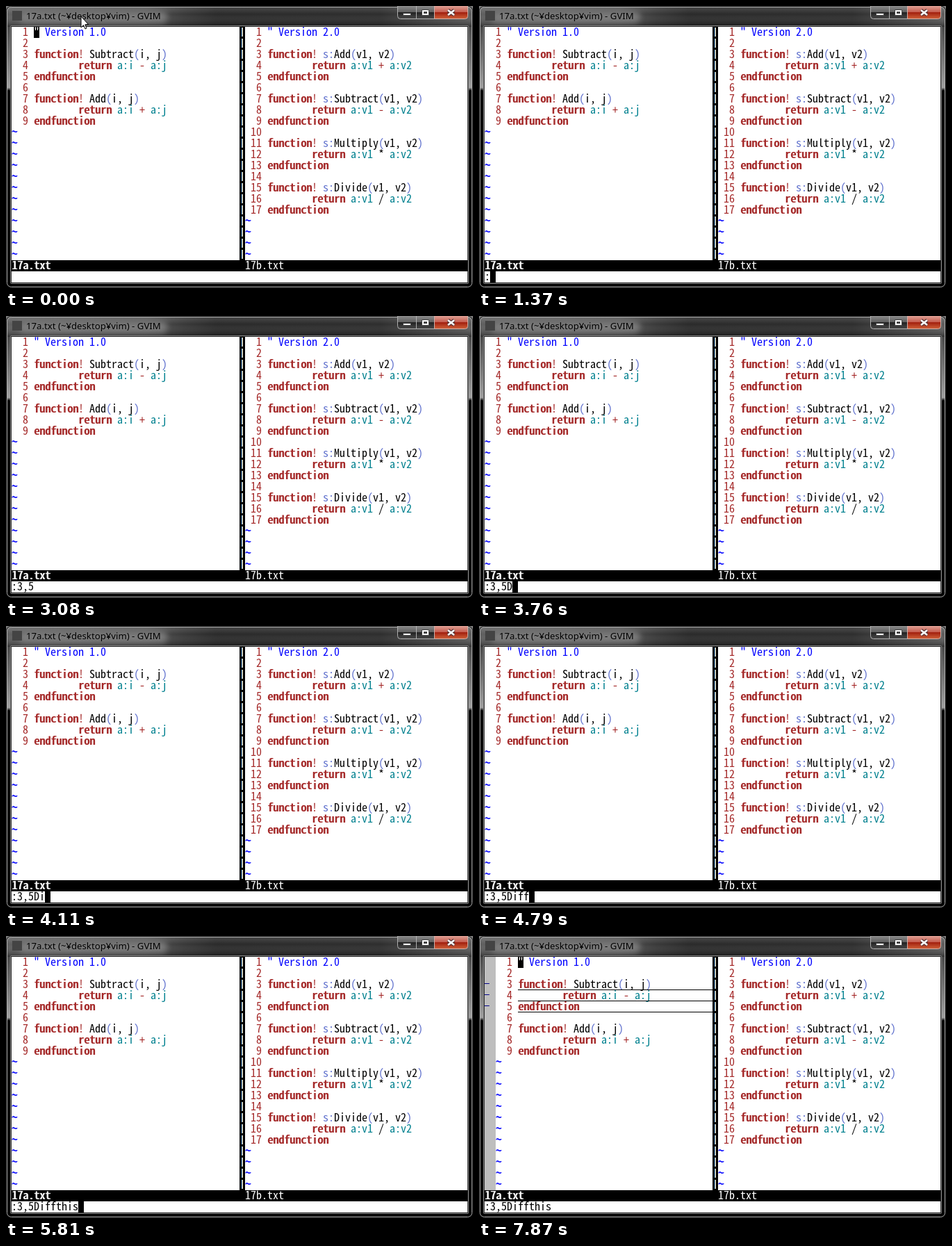
Recreate the animation shown at these times as an HTML page with a canvas. Size 672 px wide and 406 px high, loop 8 s.

```html
<!DOCTYPE html>
<html lang="en">
<head>
<meta charset="utf-8">
<title>Vim range diff</title>
<style>
html, body { margin: 0; width: 100%; height: 100%; overflow: hidden; background: #000; }
canvas { display: block; }
</style>
</head>
<body>
<canvas id="stage" width="672" height="406"></canvas>
<script>
const ctx = document.getElementById('stage').getContext('2d');
const LOOP = 8000, DIFF_AT = 7870;
const CW = 8, LH = 16, LEFT = 8, TOP = 30, ROWS = 21, SPLIT = 336, RIGHT = 344;
const BROWN = '#a52a2a', BLUE = '#0000ff', BLACK = '#000';

// Choose the font size whose advance is one cell
const FAMILY = '"Noto Sans Mono CJK JP", "Noto Sans Mono", "Liberation Mono", monospace';
ctx.font = `100px ${FAMILY}`;
const MONO = `${100 * CW / ctx.measureText('M').width}px ${FAMILY}`;

const oldText = `" Version 1.0

function! Subtract(i, j)
        return a:i - a:j
endfunction

function! Add(i, j)
        return a:i + a:j
endfunction`.split('\n');

const newText = ['" Version 2.0'];
for (const [name, op] of [['Add', '+'], ['Subtract', '-'], ['Multiply', '*'], ['Divide', '/']])
  newText.push('', `function! s:${name}(v1, v2)`, `        return a:v1 ${op} a:v2`, 'endfunction');

// Capture groups: comment, keyword, operator, special, variable
const TOKEN = /(".*)|(endfunction|function|return)|([-+!])|(s:|[()])|(a:\w+)|\w+|\S/g;
const COLORS = [BLACK, BLUE, BROWN, BROWN, '#5f70cd', '#00808f'];

const COMMAND = ':3,5Diffthis';
const KEY_TIMES = [1370, 1720, 2050, 2450, 3760, 4110, 4440, 4790, 5120, 5120, 5470, 5810];

function rect(x, y, w, h, fill) {
  ctx.fillStyle = fill;
  ctx.fillRect(x, y, w, h);
}

function text(str, x, y, color, bold) {
  ctx.font = MONO;
  ctx.fillStyle = color;
  ctx.fillText(str, x, y + 13);
  if (bold) ctx.fillText(str, x + 1, y + 13);
}

function gradient(x0, y0, x1, y1, ...stops) {
  const g = ctx.createLinearGradient(x0, y0, x1, y1);
  for (const [at, color] of stops) g.addColorStop(at, color);
  return g;
}

function box(x, y, w, h, radii, fill, stroke) {
  ctx.beginPath();
  ctx.roundRect(x, y, w, h, radii);
  if (fill) { ctx.fillStyle = fill; ctx.fill(); }
  if (stroke) { ctx.strokeStyle = stroke; ctx.lineWidth = 1; ctx.stroke(); }
}

function drawButtons() {
  const grey = gradient(0, 0, 0, 19, [0, '#8c8c8c'], [.48, '#5c5c5c'], [.5, '#222'], [1, '#4c4c4c']);
  const red = gradient(0, 0, 0, 19, [0, '#dfa095'], [.48, '#c4584a'], [.5, '#a3200f'], [1, '#d2663c']);
  box(563.5, -2.5, 27, 21, [0, 0, 0, 4], grey, '#b0b0b0');
  box(590.5, -2.5, 26, 21, 0, grey, '#b0b0b0');
  box(616.5, -2.5, 48, 21, [0, 0, 4, 0], red, '#d0b0aa');
  box(571.5, 10.5, 11, 3, 0, '#fff', '#444');
  box(598.5, 5.5, 10, 8, 0, '#fff', '#444');
  rect(601, 8, 5, 3, '#444');
  for (const [color, width] of [['#533', 5], ['#fff', 2.6]]) {
    ctx.strokeStyle = color;
    ctx.lineWidth = width;
    ctx.beginPath();
    ctx.moveTo(636, 6); ctx.lineTo(645, 13);
    ctx.moveTo(645, 6); ctx.lineTo(636, 13);
    ctx.stroke();
  }
}

function drawWindow() {
  rect(0, 0, 672, 406, BLACK);
  rect(0, 0, 672, TOP, gradient(0, 0, 672, 0, [0, '#555'], [.3, '#484848'],
    [.38, '#2c2c2c'], [.45, '#1c1c1c'], [.8, '#202020'], [1, '#555']));
  rect(0, 0, 672, TOP, gradient(0, 0, 0, TOP, [0, '#ffffff38'], [.4, '#ffffff10'], [1, '#00000060']));
  ctx.filter = 'blur(4px)';
  box(18, 8, 214, 16, 8, '#7c7c7c');
  ctx.filter = 'none';

  const side = gradient(0, TOP, 0, 122, [0, '#4a4a4a'], [.95, '#a0a0a0'], [1, BLACK]);
  rect(0, TOP, LEFT, 92, side);
  rect(664, TOP, LEFT, 92, side);
  box(.5, .5, 671, 405, 7, null, BLACK);
  box(1.5, 1.5, 669, 403, 6, null, '#b4b4b4');
  box(6.5, 28.5, 659, 371, 1, null, '#8a8a8a');
  box(7.5, 29.5, 657, 369, 0, null, '#222');
  drawButtons();
  rect(9, 7, 14, 14, '#444');
  ctx.font = '13.2px "Noto Sans", "Open Sans", sans-serif';
  ctx.fillStyle = BLACK;
  ctx.fillText('17a.txt (~¥desktop¥vim) - GVIM', 29, 19);
}

function drawBuffer(lines, x) {
  for (let row = 0; row < ROWS; row++) {
    const y = TOP + row * LH;
    if (row >= lines.length) {
      text('~', x, y, BLUE, true);
      continue;
    }
    text(String(row + 1).padStart(3), x, y, BROWN);
    for (const m of lines[row].matchAll(TOKEN)) {
      const kind = Math.max(0, m.findIndex((part, i) => i && part));
      text(m[0], x + (4 + m.index) * CW, y, COLORS[kind], kind === 2);
    }
  }
}

function drawDiffMarks() {
  rect(LEFT, TOP, 2 * CW, ROWS * LH, '#bebebe');
  for (let row = 2; row < 5; row++) {
    const y = TOP + row * LH;
    rect(LEFT, y + 6, 7, 1, '#00008b');
    rect(56, y + 15, SPLIT - 56, 1, BLACK);
  }
}

function drawPointer() {
  ctx.beginPath();
  [[108, 15], [108, 31], [111.5, 27.5], [114, 33], [116, 32], [113.8, 26.8], [118.5, 26.5]]
    .forEach(p => ctx.lineTo(...p));
  ctx.closePath();
  ctx.fillStyle = '#fff';
  ctx.fill();
  ctx.strokeStyle = BLACK;
  ctx.lineWidth = 1;
  ctx.stroke();
}

function draw(t) {
  const diff = t >= DIFF_AT;
  const typed = COMMAND.slice(0, KEY_TIMES.filter(k => k <= t).length);
  const bufferX = LEFT + (diff ? 2 * CW : 0);

  drawWindow();
  rect(LEFT, TOP, 656, 368, '#fff');
  drawBuffer(oldText, bufferX);
  drawBuffer(newText, RIGHT);
  if (diff) drawDiffMarks();

  rect(SPLIT, TOP, CW, ROWS * LH, BLACK);
  for (let row = 0; row < ROWS; row++) {
    const y = TOP + row * LH + 1;
    rect(339, y, 1, 13, '#78bcff');
    rect(340, y, 1, 13, '#ffe0a0');
  }

  const statusY = TOP + ROWS * LH, commandY = statusY + LH;
  rect(LEFT, statusY, 656, LH, BLACK);
  text('17a.txt', LEFT, statusY, '#fff', true);
  text('17b.txt', RIGHT, statusY, '#fff');
  text(typed, LEFT, commandY, BLACK);

  if (!typed || diff) {
    const x = bufferX + 4 * CW;
    rect(x, TOP, CW, LH, BLACK);
    text('"', x, TOP, '#fff');
  } else if (t < 3080 || t >= 3410) {
    rect(LEFT + typed.length * CW, commandY, CW, LH, BLACK);
  }
  if (!typed) drawPointer();
}

function frame() {
  draw(performance.now() % LOOP);
  requestAnimationFrame(frame);
}
frame();
</script>
</body>
</html>
```
